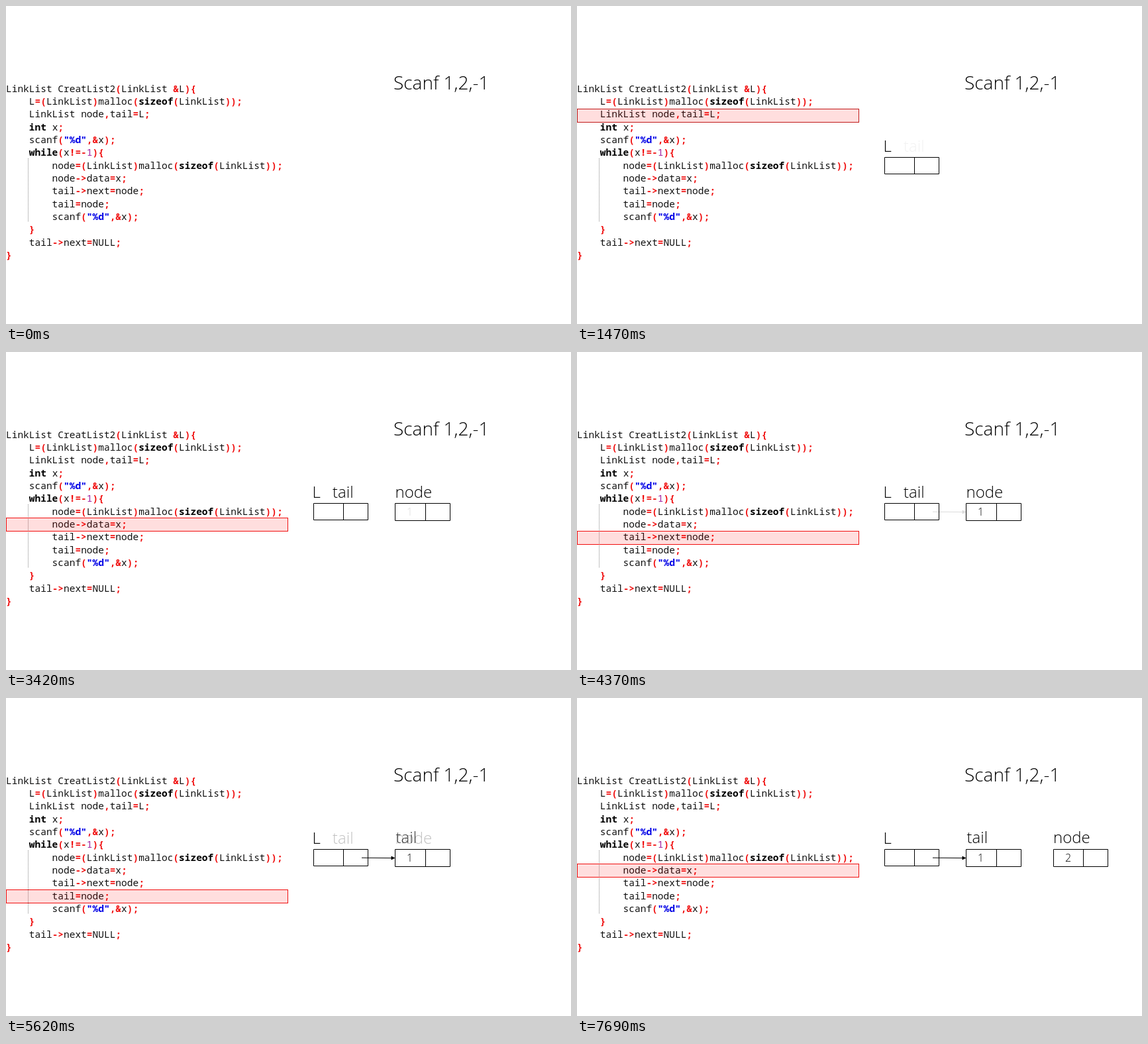
An HTML page that plays this animation: 853 px wide and 480 px high, repeating every 8000 ms.

```html
<!DOCTYPE html>
<html lang="en">
<head>
<meta charset="utf-8">
<title>Linked list, tail insertion</title>
<style>
html, body { margin: 0; width: 100%; height: 100%; overflow: hidden; background: #fff; }
svg { display: block; width: 853px; height: 480px; }
text { white-space: pre; fill: #000; }
.code text { font: 14.5px "Noto Sans Mono", monospace; fill: #111; }
.code .key, .code .op, .code .str { font-weight: 700; }
.code .key { fill: #000; }
.code .op { fill: #f01010; }
.code .str { fill: #0000e6; }
.code .num { fill: #a020a0; }
.label { font: 300 24px "Open Sans", "Noto Sans", sans-serif; }
.title { font-size: 28px; }
.value { font-size: 16px; text-anchor: middle; }
.box, .link { fill: none; stroke: #000; stroke-width: 1; }
</style>
</head>
<body>
<svg id="stage" viewBox="0 0 853 480"></svg>
<script>
const LOOP = 8000, TICK = 60;
const stage = document.getElementById("stage");

const source = `LinkList CreatList2(LinkList &L){
    L=(LinkList)malloc(sizeof(LinkList));
    LinkList node,tail=L;
    int x;
    scanf("%d",&x);
    while(x!=-1){
        node=(LinkList)malloc(sizeof(LinkList));
        node->data=x;
        tail->next=node;
        tail=node;
        scanf("%d",&x);
    }
    tail->next=NULL;
}`;

// start time, first opacity, top and border of the highlighted row
const steps = [
  { at: 530, from: 0.05, row: 135, edge: "#c01818" },
  { at: 1470, from: 0.05, row: 155, edge: "#c01818" },
  { at: 2410, from: 0.05, row: 231, edge: "#f01010" },
  { at: 3420, from: 0.14, row: 250, edge: "#f01010" },
  { at: 4370, from: 0.14, row: 270, edge: "#f01010" },
  { at: 5320, from: 0.14, row: 289, edge: "#f01010" },
  { at: 6270, from: 0.05, row: 231, edge: "#f01010" },
  { at: 7210, from: 0.05, row: 250, edge: "#f01010" }
];

function add(tag, attrs, parent = stage, text = "") {
  const el = document.createElementNS("http://www.w3.org/2000/svg", tag);
  for (const name in attrs) el.setAttribute(name, attrs[name]);
  el.textContent = text;
  return parent.appendChild(el);
}

const kinds = [
  [/^"/, "str"],
  [/^(int|while|sizeof)$/, "key"],
  [/^\d/, "num"],
  [/^[^\w\s]/, "op"]
];
const code = add("g", { class: "code" });
source.split("\n").forEach((line, i) => {
  const row = add("text", { x: 0, y: 129.5 + 19.35 * i }, code);
  for (const token of line.match(/"[^"]*"|\w+|\s+|[^\w\s"]+/g)) {
    const kind = kinds.find(([rule]) => rule.test(token));
    add("tspan", { class: kind ? kind[1] : "" }, row, token);
  }
});
add("path", { d: "M33.5 230V326", stroke: "#888", "stroke-dasharray": "1 1" });

const marker = add("rect", { x: 0.5, width: 425, height: 20, fill: "#f00", "fill-opacity": 0.13 });
add("text", { class: "label title", x: 585, y: 125.5 }, stage, "Scanf 1,2,-1");

// each part fades in at one step and may fade out at another
const parts = [];
function part(show, hide) {
  const el = add("g", {});
  parts.push({ el, show, hide });
  return el;
}
const label = (g, x, y, text) => add("text", { class: "label", x, y }, g, text);
const value = (g, x, text) => add("text", { class: "label value", x, y: 247 }, g, text);
const box = (g, x, w, h, split) =>
  add("path", { class: "box", d: `M${x} 228.5h${w}v${h}h${-w}zm${split} 0v${h}` }, g);

const head = part(0);
label(head, 462.5, 220, "L");
box(head, 464.5, 82, 25, 45);
label(part(1, 5), 493, 220, "tail");
box(part(2), 587.5, 83, 26, 46);
label(part(2, 5), 587.5, 220, "node");
value(part(3), 609.5, "1");
const link = part(4);
add("path", { class: "link", d: "M537 241.2L584 241.6" }, link);
add("path", { d: "M587.5 241.6l-6 -3v6z" }, link);
label(part(5), 588.5, 219, "tail");
const second = part(6);
label(second, 719, 219, "node");
box(second, 719.5, 82, 26, 45);
value(part(7), 741.5, "2");

function progress(i, t) {
  const { at, from } = steps[i];
  return t < at ? 0 : Math.min(1, from + 0.123 * Math.floor((t - at) / TICK));
}

function draw(t) {
  const step = steps.filter(s => s.at <= t).pop();
  marker.setAttribute("visibility", step ? "visible" : "hidden");
  if (step) {
    marker.setAttribute("y", step.row + 0.5);
    marker.setAttribute("stroke", step.edge);
  }
  for (const { el, show, hide } of parts) {
    const gone = hide === undefined ? 0 : progress(hide, t);
    el.setAttribute("opacity", progress(show, t) * (1 - gone));
  }
}

const begin = performance.now();
function frame() {
  draw((performance.now() - begin) % LOOP);
  requestAnimationFrame(frame);
}
draw(0);
frame();
</script>
</body>
</html>
```
